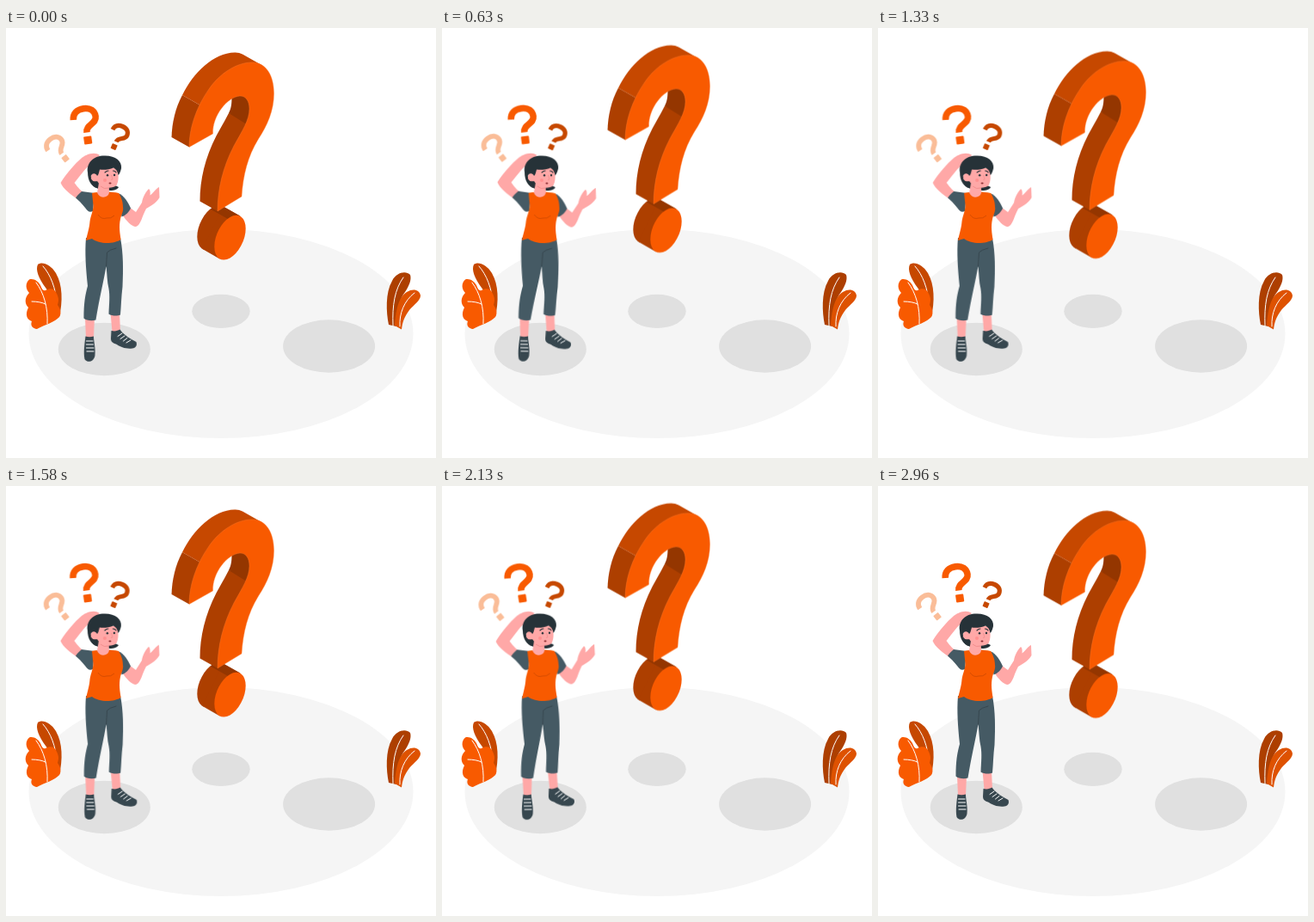
Write an HTML page without scripts that moves like this. It is 500 px wide and 500 px high and loops after 3 s.

```html
<!DOCTYPE html>
<html lang="en">
<head>
<meta charset="utf-8">
<title>Wondering</title>
<style>
  html, body { margin: 0; width: 100%; height: 100%; overflow: hidden; background: #fff; }
  svg { display: block; width: 100%; height: 100%; }

  .main { fill: #f85a00; }
  .top { fill: #c64800; }
  .side { fill: #ad3f00; }
  .deep { fill: #943600; }
  .skin { fill: #ffa8a7; }
  .hair { fill: #263238; }
  .denim { fill: #455a64; }
  .shoe { fill: #37474f; }
  .ground { fill: #f5f5f5; }
  .shade { fill: #e0e0e0; }
  .line { fill: none; stroke: #fff; stroke-width: 1; stroke-linecap: round; }
  .fold { fill: none; stroke: #37474f; stroke-width: 1; stroke-linecap: round; }
  .edge { stroke: #ff7b2e; stroke-width: .4; }

  .float { animation: float 1.5s linear -30ms infinite; }
  .sway { transform-origin: 111px 239px; animation: sway 3s linear -30ms infinite; }

  @keyframes float {
    0%, 100% { transform: translateY(.4px); }
    50% { transform: translateY(-9.6px); }
  }
  @keyframes sway {
    0%, 100% { transform: rotate(0deg); }
    25% { transform: rotate(1deg); }
    75% { transform: rotate(-1deg); }
  }
</style>
</head>
<body>
<svg viewBox="0 0 500 500">
  <defs>
    <g id="ask">
      <path d="M-13.500 11.500C-13 4-8 0 0 0C8 0 12.700 4.500 12.700 11C12.700 20 0 18.500 0 28" fill="none" stroke="currentColor" stroke-width="7.500"/>
      <rect x="-4.600" y="32.600" width="9.200" height="9" rx="1" fill="currentColor"/>
    </g>
  </defs>

  <ellipse class="ground" cx="250" cy="355.500" rx="223.500" ry="121.500"/>
  <ellipse class="shade" cx="114.300" cy="373.500" rx="53.500" ry="30.700"/>
  <ellipse class="shade" cx="250" cy="329.300" rx="33.700" ry="19.600"/>
  <ellipse class="shade" cx="375.600" cy="370" rx="53.500" ry="30.700"/>

  <!-- left plant -->
  <path class="top" d="M62 336C66 318 66 299 58 285C52 275 42 271 37 275C34 281 38 291 46 302C54 312 57 323 57 337Z"/>
  <path class="line" d="M43 277C52 287 58 303 59 320"/>
  <path class="main" d="M36 350C31 349.500 28 346 30 341C24 339 22 333 26 325C21 320 22 313 27 308C23 304 22 297 27 292.500C32 291 37 294 40 299C42 304 43 306 46 305C51 302 57 303 59 309C62 315 61 318 60 322C63 327 65 331 62 336C57 342 45 345 36 350Z"/>
  <path class="line" d="M35 296C44 308 49 325 48 344M30 318C36 318 42 319 46 321"/>

  <!-- right plant -->
  <path class="side" d="M445 345C442 330 441 308 449 294C454 284 465 282 470 287C472 293 468 301 464 307C458 315 455 325 454 347Z"/>
  <path class="line" d="M462 290C452 304 449 322 450 346"/>
  <path fill="#de5200" d="M460 350.500L452 346C453 330 456 313 466 307C474 302 481 305 482 311C482 317 474 322 469 328C463 336 461 342 460 350.500Z"/>
  <path class="line" d="M475 308C463 317 457 332 458 347"/>

  <!-- big question mark -->
  <g class="float">
    <circle class="side" r="1" transform="matrix(18.200 -10.500 0 23.700 240.500 232.300)"/>
    <path class="side" d="M252.500 207.400L272.500 218.800L248.500 268.500L228.500 257.100Z"/>
    <path class="deep" d="M237.500 210.500Q246 204.500 252.500 207.400L272.500 218.800Q266 217 258 222Z"/>
    <circle class="main" r="1" transform="matrix(18.200 -10.500 0 23.700 260.500 243.700)"/>

    <path class="side" d="M192.500 127C193 110 197 93 205 78L227 90.500L213 138.500Z"/>
    <path class="top" d="M205 78C218 52 241 29 266 28.500Q271 28.300 275 30.500L298 43.500L270 60L227 90.500Z"/>
    <path class="side" d="M246 213L225.500 201.500C225.500 176.500 231.500 150.500 244.500 125.500C252 112 256 105 259 99L284 104Z"/>
    <path class="deep" d="M259 99C262 93 262.500 88 262.500 80L268 76H290V95L279 111.500Z"/>
    <path class="main edge" d="M213 138.500C213 118 220 94 236 71C249 52 269 40 286 40C303 40 311.500 56 311.500 76C311.500 96 304 113 293.500 129C281 149 275.500 172 274 196L246 213C246 188 252 162 265 137C275 119 283 107 283 94C283 85 279 79 272 79C258 80 240 101 240.500 123Z"/>
  </g>

  <!-- thinking woman -->
  <g class="sway">
    <use href="#ask" color="#fabd98" transform="translate(51.500 129.200) rotate(-38) scale(.77)"/>
    <use href="#ask" color="#f85a00" transform="translate(90 93.700) rotate(-8)"/>
    <use href="#ask" color="#c64800" transform="translate(135.600 114.500) rotate(23) scale(.69)"/>

    <!-- legs -->
    <path class="skin" d="M92 337H103L102 360H93ZM121.500 331H132L133 353H123.500Z"/>
    <path class="shoe" d="M92.500 358.500Q97 360 102 358.500C102 365 104.500 372 103.500 381C102 389 94 389.500 91.500 385C90 377 91.500 367 92.500 358.500Z"/>
    <path class="shoe" d="M122.500 352C127 353 130 352 132.500 350.500C138 358 146 362 151.500 365C153 369 151 372 147 372.500C140 373.500 133 371 129 368C124 366 122 365 122 361Z"/>
    <path class="line" d="M93.500 364H101M93.500 368H101.500M93.500 372H102M94 376H102M130 358.500L135 355M133 361.500L138 358M136.500 364L141 360.500M140 366L145 363"/>
    <path class="denim" d="M93 244H133C136.500 262 136.500 281 135.500 301C134 313 134 323 133 333.500C130 335 123 335 119.500 332.500C120 320 121 312 119.500 303C117.500 295 117.500 285 116.500 277C114 292 108.500 315 104.500 339.500C100 341 93 340 90.500 337.500C90.500 320 92 311 95 300C93 280 91.500 262 93 244Z"/>
    <path class="fold" d="M128 256Q120 258 117.500 261Q117 270 116.500 277"/>

    <!-- arms -->
    <path class="skin" d="M63.500 180C71 168 81 157 87 152C92 147 103 143 109 148L101 156C93 162 86 172 79.500 180C83 185 88 190 91 192L83 199C76 194 66 187 63.500 180Z"/>
    <path class="skin" d="M135 217C140 224 146 231 151 231C157 229 158 219 163 210C170 206 176 202 178.500 197L178 185C175 186 172 191 167.500 194.500C168 191 167.500 188 166 187C163 190 159 196 158 203L151 214L143 208Z"/>
    <path class="denim" d="M88 190L103 192L101 213C97 215 95 213 92 209C88 204 84 200 81 197.500C83 194 86 192 88 190Z"/>
    <path class="denim" d="M130 192C138 195 142 203 145 209.500C143 214 139 218 134.500 219.500Z"/>

    <!-- shirt -->
    <path class="main" d="M100 192C108 190 123 190 131 192C135 198 136 204 136 208C137 213 134 217 133 222C131 231 132.500 239 133.500 246C126 251 109 252 100 245L93 247C95 238 97 232 97.500 225C98.500 218 101.500 213 101.500 206Z"/>
    <path d="M107 217Q111 223 117 221Q122 222 126 218" fill="none" stroke="#d64c00"/>

    <!-- head -->
    <path class="hair" d="M97 172C97 182 103 187 114 188C121 190 129 189 131 185L121 180Z"/>
    <path class="skin" d="M108 180H119.500L120 191C119 198 109 199 106 191.500Z"/>
    <path class="skin" d="M106 163H129C131.500 171 131 178 128.500 183C124 187 115 186 110 183.500L106 178C101 180 98 176 99 172C100 168 104 168 106 171Z"/>
    <path d="M110 184Q114 188 119.500 186" fill="none" stroke="#f28f8f"/>
    <path class="hair" d="M95 168C93 156 103 148.500 114 148.500C127 148 135 155 134 163C133 168 131 171 130.500 171C130 167 128 164 125 162.500C120 165 113 165 109 164.500C108 168 107.500 171 106 172C104 167.500 98.500 169 98.500 173.500C98.500 177 101 179 105 178.500C105 182 106 184 107 186.500C99 185 95 177 95 168Z"/>
    <circle class="hair" cx="118" cy="171.300" r="1.200"/>
    <circle class="hair" cx="126" cy="171" r="1.200"/>
    <path d="M115 168Q117 166 119 166M124.500 166Q127 166 128 168" fill="none" stroke="#263238" stroke-width="1.100" stroke-linecap="round"/>
    <path d="M122.500 171L124 176L122 176.500" fill="none" stroke="#f28f8f" stroke-width=".8"/>
    <circle cx="115" cy="177" r="2" fill="#ff9190"/>
    <ellipse cx="121" cy="180.500" rx="1.500" ry="1.100" fill="#8e2f35"/>
  </g>
</svg>
</body>
</html>
```
